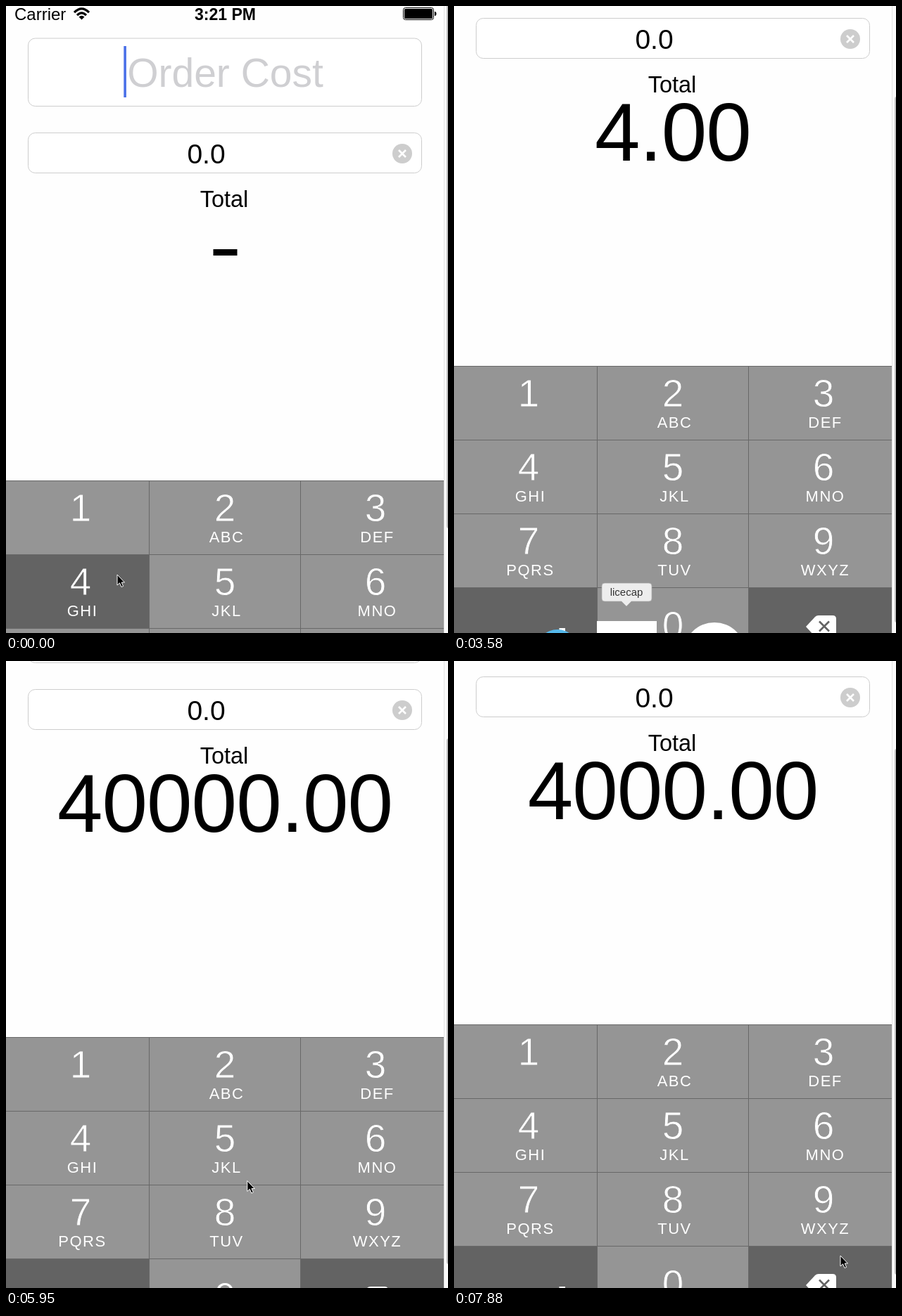
These frames come from a looping animation (628 by 892 pixels, 8 s). An HTML page:

```html
<!DOCTYPE html>
<html lang="en">
<head>
<meta charset="utf-8">
<title>Tip calculator</title>
<style>
  html, body { margin: 0; width: 100%; height: 100%; overflow: hidden; background: #fefefe; }
  svg { display: block; font-family: "Liberation Sans", Arial, sans-serif; }
  .mid, .key, .letters { text-anchor: middle; }
  .key { font-size: 55px; fill: #fff; stroke-width: .9px; }
  .letters { font-size: 22px; letter-spacing: 1.5px; fill: #fff; }
  .field { fill: #fff; stroke: #cdcdcd; }
</style>
</head>
<body>
<svg width="628" height="892" viewBox="0 0 628 892">
  <defs>
    <g id="clear">
      <circle r="14" fill="#cdcdcd"/>
      <path d="M-5-5L5 5M5-5L-5 5" stroke="#fff" stroke-width="2.6"/>
    </g>
  </defs>
  <rect width="628" height="892" fill="#fefefe"/>
  <g id="page">
    <text x="12" y="20" font-size="24">Carrier</text>
    <g fill="none" stroke="#000" stroke-width="3.2">
      <path d="M97 9.2Q107.500-1.500 118 9.200"/>
      <path d="M101 13.200Q107.500 6.500 114 13.200"/>
    </g>
    <path d="M103.500 15.500Q107.500 12 111.500 15.500L107.500 19.500Z"/>
    <text class="mid" x="311.500" y="20" font-size="23" font-weight="bold">3:21 PM</text>
    <rect x="564.500" y="2.500" width="43" height="17" rx="3" fill="none" stroke="#000"/>
    <rect x="566" y="4" width="40" height="14" rx="1.500"/>
    <path d="M609 8q2.500 0 2.500 3t-2.500 3z"/>

    <rect class="field" x="31.500" y="46" width="559" height="96.500" rx="10"/>
    <rect class="field" x="31.500" y="180.500" width="559" height="57" rx="10"/>
    <text id="hint" class="mid" x="311.500" y="115" font-size="57" fill="#cfcfd2">Order Cost</text>
    <text id="cost" class="mid" x="284.500" y="115" font-size="57"></text>
    <rect id="caret" y="57" width="3.600" height="73" fill="#4a70e8"/>
    <use id="clearCost" href="#clear" x="563" y="95.500"/>
    <text class="mid" x="284.500" y="223.500" font-size="39">0.0</text>
    <use href="#clear" x="563" y="210"/>
    <text class="mid" x="310" y="286" font-size="32.500">Total</text>
    <rect id="dash" x="294.500" y="346" width="34" height="9"/>
    <text id="total" class="mid" x="311" y="383" font-size="116" letter-spacing="-1"></text>
    <g id="pad"></g>
  </g>

  <rect x="622" width="6" height="892" fill="#fafafa"/>
  <path d="M622.500 0V892" stroke="#e4e4e4"/>
  <rect id="thumb" x="626" width="6" height="748" rx="3" fill="#bdbdbd"/>

  <g id="dock">
    <circle cx="147" cy="917" r="30" fill="#55b8ea"/>
    <rect x="203" y="875" width="85" height="85" fill="#fff"/>
    <circle cx="370" cy="921" r="44" fill="#fff"/>
    <path d="M214 821H277a4 4 0 0 1 4 4V843a4 4 0 0 1-4 4H252L245 854L238 847H214a4 4 0 0 1-4-4V825a4 4 0 0 1 4-4Z"
      fill="#ededed" stroke="#aaa" stroke-width=".7"/>
    <text class="mid" x="245" y="839" font-size="15" fill="#333">licecap</text>
  </g>
  <path id="pointer" d="M0 0V15L3.500 11.800L6 17.500L8.600 16.400L6.200 11H10.500Z" stroke="#fff"/>
</svg>
<script>
const LOOP = 8000, STEP = 148.6;
const LIGHT = '#959595', DARK = '#636363';
const $ = id => document.getElementById(id);

// Key frames are [step, value...]
const scrollKeys = [[16, 0], [17, 70], [18, 169], [19, 172], [20, 168], [22, 163], [39, 163],
  [40, 140], [41, 80], [42, 30], [43, 8], [44, 0], [45, 0], [46, 30], [47, 100], [48, 150], [49, 160], [50, 158]];
const pointerKeys = [[1, 158, 809], [3, 170, 800], [8, 540, 757], [10, 578, 735], [12, 583, 726],
  [18, 564, 712], [21, 420, 820], [23, 250, 900], [27, 270, 900], [30, 321, 858], [37, 321, 858],
  [41, 350, 700], [45, 365, 644], [47, 400, 690], [51, 547, 840], [53, 549, 846]];
const dockKeys = [[23, 90], [24, 0], [25, -16], [27, -16], [29, 25], [30, 90]];
const typed = [[0, ''], [1, '4'], [32, '40'], [33, '400'], [34, '4000'], [37, '40000'], [53, '4000']];

function tween(keys, n) {
  const i = keys.findIndex(k => k[0] > n);
  if (i === 0) return keys[0].slice(1);
  if (i < 0) return keys[keys.length - 1].slice(1);
  const a = keys[i - 1], b = keys[i], p = (n - a[0]) / (b[0] - a[0]);
  return a.slice(1).map((v, j) => v + (b[j + 1] - v) * p);
}

function buildPad() {
  const letters = ['', 'ABC', 'DEF', 'GHI', 'JKL', 'MNO', 'PQRS', 'TUV', 'WXYZ'];
  const edges = [0, 203.5, 418.5, 622], centers = [106, 311, 525];
  let out = '';
  for (let i = 0; i < 12; i++) {
    const col = i % 3, row = Math.floor(i / 3), y = 675 + row * 105.2;
    const name = i < 9 ? i + 1 : ['dot', 0, 'del'][col];
    const fill = i === 9 || i === 11 ? DARK : LIGHT;
    out += `<rect id="k${name}" x="${edges[col]}" y="${y}" width="${edges[col + 1] - edges[col]}" height="105.2" fill="${fill}"/>`;
    if (i < 9 || i === 10)
      out += `<text id="d${name}" class="key" stroke="${fill}" x="${centers[col]}" y="${i < 9 ? y + 58 : 1062.5}">${name}</text>`;
    if (letters[i])
      out += `<text class="letters" x="${centers[col] + 2.5}" y="${y + 88}">${letters[i]}</text>`;
  }
  out += `<path d="M0 675.5H622M0 780.5H622M0 885.5H622M0 990.5H622M203.5 675V1096M418.5 675V1096" stroke="#686868"/>
    <rect x="149.500" y="1048" width="8.500" height="8.500" fill="#fff"/>
    <path d="M500 1046L513 1032Q515 1030 518 1030H538Q543 1030 543 1035V1057Q543 1062 538 1062H518Q515 1062 513 1060Z" fill="#fff"/>
    <path d="M519 1038.500L533 1052.500M533 1038.500L519 1052.500" stroke="${DARK}" stroke-width="2.600"/>`;
  $('pad').innerHTML = out;
}

function press(digit, down) {
  const color = down ? DARK : LIGHT;
  $('k' + digit).setAttribute('fill', color);
  $('d' + digit).setAttribute('stroke', color);
}

const show = (id, on) => $(id).setAttribute('visibility', on ? 'visible' : 'hidden');
const move = (id, x, y) => $(id).setAttribute('transform', `translate(${x} ${y})`);

function draw(time) {
  const n = Math.floor((time % LOOP + 10) / STEP);
  const [since, text] = typed.filter(k => k[0] <= n).pop();
  const [scroll] = tween(scrollKeys, n), [dockY] = tween(dockKeys, n);

  $('cost').textContent = text;
  $('total').textContent = text && text + '.00';
  show('hint', !text);
  show('dash', !text);
  show('clearCost', text);
  show('caret', (n - since) * STEP % 1060 < 530);
  $('caret').setAttribute('x', text ? 283.5 + text.length * 15.85 : 167.3);
  press(4, n < 1);
  press(0, n === 32 || n === 33);

  move('page', 0, -scroll);
  move('thumb', 0, scroll * .822 - 5);
  move('dock', 0, dockY);
  move('pointer', ...tween(pointerKeys, n));
}

buildPad();
const start = performance.now();
function loop() {
  draw(performance.now() - start);
  requestAnimationFrame(loop);
}
loop();
</script>
</body>
</html>
```
